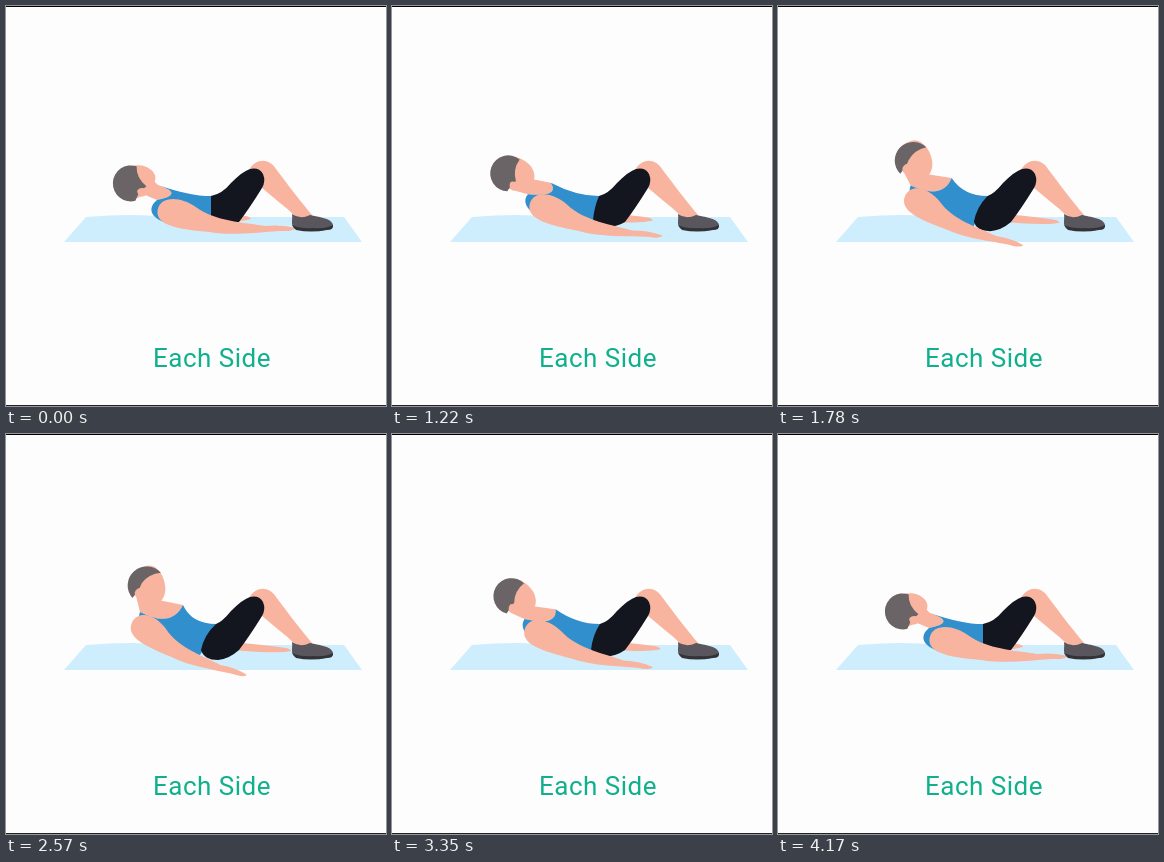
Recreate the animation shown at these times as an HTML page with a canvas. Size 380 by 400 pixels, loop 4470 ms.

```html
<!DOCTYPE html>
<html lang="en">
<head>
<meta charset="utf-8">
<style>
  html, body { margin: 0; width: 100%; height: 100%; overflow: hidden; background: #fdfdfe; }
  canvas { display: block; }
</style>
</head>
<body>
<canvas id="stage" width="380" height="400"></canvas>
<script>
const ctx = document.getElementById('stage').getContext('2d');
const LOOP = 4470;
const SKIN = '#f8b49f', HAIR = '#6b6466', BLUE = '#308fcc', DARK = '#13151f';

const progress = (t, start, length) => Math.min(1, Math.max(0, (t - start) / length));
const mix = (a, b, k) => a + (b - a) * k;

// 0 = lying, 1 = raised
function lift(t) {
  if (t < 2500) return 1 - (1 - progress(t, 910, 1090)) ** 1.5;
  const p = progress(t, 2910, 1040);
  return 1 - mix(p, p * p * (3 - 2 * p), 0.35);
}

// Quadratic Bezier path of a joint
const glide = (u, from, bend, to) =>
  from.map((v, i) => mix(mix(v, bend[i], u), mix(bend[i], to[i], u), u));

function fill(color, d) {
  ctx.fillStyle = color;
  ctx.fill(new Path2D(d));
}

function inFrame(x, y, angle, paint) {
  ctx.save();
  ctx.translate(x, y);
  ctx.rotate(angle);
  paint();
  ctx.restore();
}

function drawHead(u, x, y, angle) {
  const brow = 6 - 12 * u, sideburn = 13 - 14 * u, nape = 11 * u;
  inFrame(x, y, angle, () => {
    fill(SKIN, 'M-16 -8C-12 -19 6 -20 14 -16C22 -12 26 -4 21 2C16 9 8 15 -2 15C-14 14 -18 2 -16 -8Z');
    fill(HAIR, `M${brow} -17Q${brow - 2} -5 ${sideburn} 4L5 9L${nape} 17A18 18 0 1 1 ${brow} -17Z`);
    fill(SKIN, 'M3 8C4 4 12 4 13 9C13 15 4 16 3 8Z');
  });
}

function drawTorso(u, [headX, headY, angle], shoulder) {
  const near = glide(u, [151, 194], [125, 187], [134, 178]);
  const far = glide(u, [152, 179], [158, 177], [177, 171]);
  const dipX = (near[0] + far[0]) / 2 + 28 - 18 * u;
  const dipY = (near[1] + far[1]) / 2 + 2 + 18 * u;
  const neckline = `${near}Q${dipX} ${dipY} ${far}`;

  const c = Math.cos(angle), s = Math.sin(angle);
  const onHead = (x, y) => [headX + x * c - y * s, headY + x * s + y * c];
  fill(SKIN, `M${onHead(11, 13)}L${neckline}L${onHead(18, -4)}Z`);
  fill(BLUE, `M${neckline}Q186 191 ${208 + 5 * u} 190L${206 - 12 * u} 221
    C150 ${224 - 6 * u} ${shoulder[0] - 30 + 20 * u * u} ${shoulder[1]} ${near}Z`);
}

function drawLegs(u) {
  fill(SKIN, 'M243 164C250 152 263 152 270 163C282 179 295 196 306 209L302 214L290 211C279 200 266 191 255 181Z');
  fill(DARK, `M${205 + 5 * u} 190Q216 188 225 177Q237 165 244 163Q253 161 257 168Q260 175 256 182
    Q243 203 233 216Q${225 - 2 * u} ${219 + 6 * u} ${214 - 2 * u} ${217 + 9 * u}
    Q${204 - 6 * u} ${217 + 9 * u} ${205 - 10 * u} ${213 + 3 * u}Q${205 - 7 * u} 201 ${205 + 5 * u} 190Z`);
}

function drawShoe() {
  fill('#59575d', 'M286 208Q294 214 304 209C312 211 326 212 327 219C327 226 300 226 289 223C284 219 287 214 286 208Z');
  fill('#333238', 'M286 219Q295 223 307 222Q319 223 327 219Q328 224 321 224Q305 227 290 224Z');
}

function drawFarArm(u) {
  const x = 245 + 40 * u, y = 213 + 4 * u;
  fill(SKIN, `M200 208Q225 207 ${x - 12} ${y - 4}Q${x} ${y - 3} ${x} ${y}Q${x - 12} ${y + 3} 225 216Z`);
}

function drawNearArm(u, [x, y]) {
  const dx = 290 - 49 * u - x, dy = 222 + 19 * u - y;
  inFrame(x, y, Math.atan2(dy, dx), () => {
    ctx.scale(Math.hypot(dx, dy) / 120, 1);
    fill(SKIN, `M-14 0C-13 -16 8 -16 22 -8C42 4 70 1 90 2Q106 -2 120 0
      Q118 4 105 5C85 9 62 16 38 15C10 16 -14 16 -14 0Z`);
  });
}

function drawFigure(u) {
  const head = glide(u, [127, 178, -0.14], [106, 167, 0.64], [140, 149, 1.31]);
  const shoulder = glide(u, [166, 206], [145, 200], [138, 194]);
  drawFarArm(u);
  drawTorso(u, head, shoulder);
  drawHead(u, ...head);
  drawLegs(u);
  drawNearArm(u, shoulder);
  drawShoe();
}

function draw() {
  ctx.fillStyle = '#fdfdfe';
  ctx.fillRect(0, 0, 380, 400);
  ctx.fillStyle = '#000';
  ctx.fillRect(0, 0, 380, 1);
  ctx.fillStyle = '#222';
  ctx.fillRect(0, 399, 380, 1);

  fill('#cfeefd', 'M58 236L80 211Q128 207 160 211H338L356 236Z');
  drawFigure(lift(performance.now() % LOOP));

  ctx.font = '26px Roboto, sans-serif';
  ctx.letterSpacing = '0.5px';
  ctx.fillStyle = '#0fb08c';
  ctx.fillText('Each Side', 147, 361);
  requestAnimationFrame(draw);
}
draw();
</script>
</body>
</html>
```
